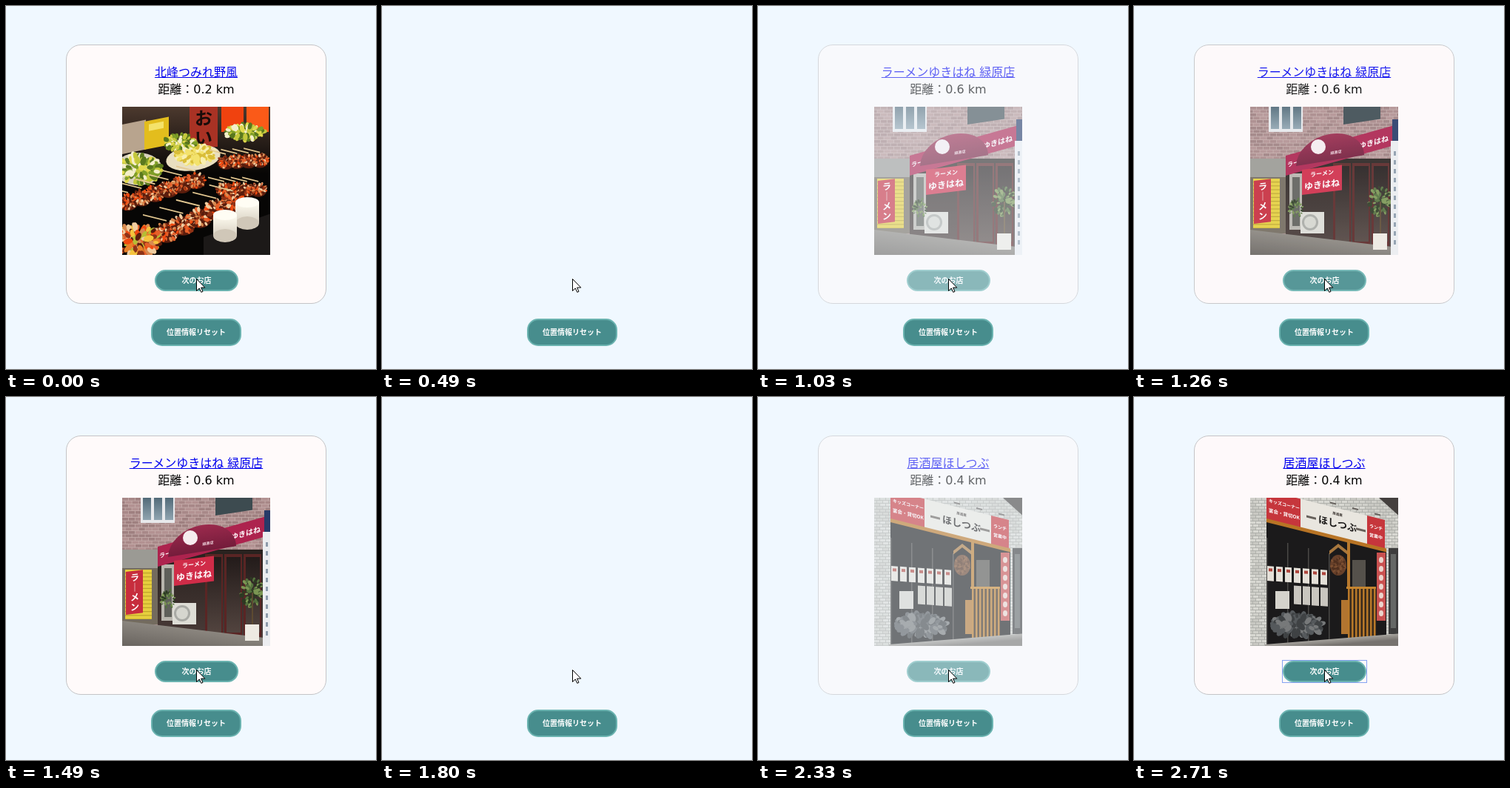
An HTML page with a canvas that plays this animation: 500x490 px, repeating every 2790 ms.

```html
<!DOCTYPE html>
<html lang="ja">
<head>
<meta charset="utf-8">
<title>お店さがし</title>
<style>
  html, body { margin: 0; width: 100%; height: 100%; overflow: hidden; background: #f0f8ff; }
  body { position: relative; font: 16px/24px "DejaVu Sans", "Noto Sans CJK JP", "Noto Sans CJK", sans-serif; color: #000; }
  .card {
    position: absolute; left: 81px; top: 52px; width: 352px; height: 350px;
    box-sizing: border-box; border: 1px solid #c4c4c6; border-radius: 20px;
    background: #fffafa; text-align: center; opacity: 0;
  }
  .card p { position: absolute; left: 0; width: 100%; margin: 0; white-space: nowrap; }
  .name { top: 25px; font-weight: 350; }
  .name a { color: #00e; text-decoration: underline 1px; }
  .distance { top: 48px; }
  canvas { position: absolute; left: 75px; top: 83px; }
  button {
    position: absolute; box-sizing: border-box; margin: 0; padding: 0 0 2px;
    border: 2px solid #6bb3b0; border-radius: 15px; background: #478d8d; color: #fff;
    font: 900 10px "Noto Sans CJK JP", "Noto Sans CJK", sans-serif; white-space: nowrap;
  }
  .next { left: 119px; top: 303px; width: 113px; height: 29px; }
  .reset { left: 196px; top: 422px; width: 122px; height: 37px; }
  .pressed .next::after { content: ""; position: absolute; inset: -3px; border: 1px solid #86a3f2; }
  .cursor { position: absolute; left: 257px; top: 367px; }
</style>
</head>
<body>
<button class="reset">位置情報リセット</button>
<svg class="cursor" width="14" height="21">
  <path d="M.5 1.5V17.5L4.3 14L6.8 19.4L9 18.4L6.6 13.1H11.8Z" fill="#fff" stroke="#000"/>
</svg>
<script>
const LOOP = 2790, STEP = 76.5, FADE = 950;
const SHOW = [0, 490, 490 + 17 * STEP];
const PRESSES = [[170, SHOW[1]], [1650, SHOW[2]], [2700, LOOP]];
const JP = '"Noto Sans CJK JP", "Noto Sans CJK", sans-serif';
const SALAD = ["#7f9e28", "#e2d94c", "#f4efca", "#5a781e", "#c4c83c"];
const MEAT = ["#8f3317", "#e5602a", "#5a1d0d", "#f04a10", "#d98a50", "#f1cda0"];

let g, seed;
const rand = (a = 0, b = 1) => {
  seed = (seed * 16807) % 2147483647;
  return a + (b - a) * seed / 2147483647;
};
const times = (n, fn) => { for (let i = 0; i < n; i++) fn(i); };

function rect(color, x, y, w, h) {
  g.fillStyle = color;
  g.fillRect(x, y, w, h);
}
function oval(color, x, y, rx, ry = rx, turn = 0) {
  g.fillStyle = color;
  g.beginPath();
  g.ellipse(x, y, rx, ry, turn, 0, 7);
  g.fill();
}
function label(text, color, size, x, y) {
  g.fillStyle = color;
  g.font = `900 ${size}px ${JP}`;
  g.textAlign = "center";
  g.textBaseline = "middle";
  g.fillText(text, x, y);
}
function column(text, color, size, x, y) {
  [...text].forEach((c, i) => label(c === "ー" ? "｜" : c, color, size, x, y + i * size * 1.1));
}
// Draws in a space that starts at x, y and slopes like a wall in perspective
function tilt(x, y, slope, paint) {
  g.save();
  g.transform(1, slope, 0, 1, x, y);
  paint();
  g.restore();
}
function fade(top, bottom, y, h) {
  const fill = g.createLinearGradient(0, y, 0, y + h);
  fill.addColorStop(0, top);
  fill.addColorStop(1, bottom);
  return fill;
}
function tiles(joint, colors, w, h) {
  rect(joint, 0, 0, 200, 200);
  times(200 / h, row => times(200 / w + 1, col =>
    rect(colors[Math.floor(rand(0, colors.length))], (col - row % 2 / 2) * w, row * h, w - .8, h - .8)));
}
// Random patches inside an ellipse
function scatter(colors, x, y, r, flat = .6) {
  times(r * 5, i => {
    const a = rand(0, 6.28), d = r * Math.sqrt(rand()), size = rand(.08, .2) * r + .5;
    oval(colors[i % colors.length], x + d * Math.cos(a), y + d * flat * Math.sin(a), size, size * .6, a);
  });
}
function skewers(x, y, slope, count, size) {
  times(count, i => {
    const cx = x + i * size * 1.4, cy = y + i * size * 1.4 * slope;
    tilt(cx, cy, .25, () => rect("#e4c992", -size * 2, -size, size * 2, 1.8));
    oval(MEAT[2], cx, cy + 2, size, size * .8);
    scatter(MEAT, cx, cy, size, .75);
  });
}

function food() {
  rect(fade("#4c392e", "#070605", 0, 90), 0, 0, 200, 200);
  tilt(0, 24, -.2, () => rect("#b8a48e", 0, 0, 32, 40));
  tilt(30, 20, -.2, () => {
    rect("#e3bd1d", 0, 0, 33, 38);
    rect("#f4e26a", 6, 5, 20, 9);
  });
  tilt(91, 0, -.05, () => {
    rect("#a93224", 0, 0, 38, 56);
    column("おい", "#1a0c0a", 24, 19, 16);
  });
  times(2, i => rect(["#f0420f", "#fa5a18"][i], 134 + i * 34, 0, 30, 34));

  oval("#e9dfc0", 96, 69, 37, 17, -.15);
  scatter(["#f3e26c", "#f8efb0", "#d9bd38"], 98, 64, 26, .5);
  scatter(SALAD, 78, 48, 21, .5);
  scatter(SALAD, 166, 34, 26, .35);
  oval("#d8d2bc", 22, 84, 32, 22);
  scatter(SALAD, 22, 84, 29, .65);

  skewers(140, 74, -.05, 4, 11);
  skewers(138, 111, 0, 4, 11);
  skewers(8, 128, -.32, 6, 13);
  skewers(60, 169, -.45, 5, 16);
  scatter([...MEAT, "#f6c33d", "#e8822a", "#b6bd35"], 18, 180, 32, .65);

  tilt(110, 176, -.35, () => rect("#1c1918", 0, 0, 90, 90));
  times(2, i => {
    const x = 169 - i * 30, y = 129 + i * 17;
    rect(fade("#fffdf2", "#d0c7b8", y, 34), x - 16, y, 32, 28);
    oval("#d0c7b8", x, y + 28, 16, 9);
    oval("#fffdf4", x, y, 16, 7);
  });
}

function noodleShop() {
  tiles("#c5adab", ["#a88888", "#9f8080", "#b39292"], 9, 4.5);
  rect("#e8e9ec", 25, 0, 46, 34);
  times(3, i => rect(fade("#526a78", "#90a4b0", 0, 30), 28 + i * 15, 0, 11, 30));
  tilt(126, 0, -.15, () => rect("#3d4b50", 0, 0, 50, 24));

  rect("#9b9a94", 0, 70, 50, 28);
  rect("#736b5e", 0, 95, 50, 76);
  rect("#bda42b", 4, 97, 36, 67);
  times(13, i => rect("#e6cf3e", 4, 97 + i * 5.2, 36, 4));
  tilt(5, 100, -.12, () => {
    rect("#c72d3d", 0, 0, 23, 58);
    column("ラーメン", "#fff", 12, 12, 9);
  });

  rect(fade("#29221f", "#4a3b38", 80, 110), 48, 70, 146, 125);
  rect("#b8b5ad", 53, 90, 17, 76);
  rect("#5f605a", 57, 95, 10, 66);
  times(3, i => {
    rect("#5a2524", 112 + i * 26, 76, 24, 112);
    rect(fade("#231b1a", "#51433e", 80, 100), 115 + i * 26, 80, 19, 102);
  });

  tilt(48, 66, -.28, () => {
    rect("#ad234e", 0, 0, 145, 27);
    label("ラー", "#fff", 8, 10, 13);
    label("ゆきはね", "#fff", 10, 119, 15);
  });
  tilt(62, 80, -.16, () => {
    g.beginPath();
    g.ellipse(46, 0, 46, 36, 0, Math.PI, 0);
    g.fillStyle = fade("#9c2a4d", "#741c3b", -36, 36);
    g.fill();
    label("緑原店", "#f5dfe6", 5, 54, -10);
  });
  oval("#f6ecef", 92, 54, 10);
  tilt(70, 85, -.12, () => {
    rect("#d02c48", 0, 0, 54, 34);
    label("ラーメン", "#fff", 8, 27, 8);
    label("ゆきはね", "#fff", 12, 27, 23);
  });

  tilt(0, 166, .12, () => rect(fade("#8b867f", "#69645f", 0, 34), 0, 0, 200, 60));
  rect("#deddd6", 68, 142, 32, 29);
  oval("#a9aaa5", 81, 156, 11);
  oval("#d6d6cf", 81, 156, 8);
  times(2, i => scatter(["#54713d", "#7b9653", "#2c3a22"], 176 - i * 114, 128 + i * 8, 16 - i * 6, 1.2));
  rect("#5d4a31", 175, 128, 2, 44);
  rect("#eeeae2", 166, 171, 19, 22);
  rect("#263a68", 192, 17, 8, 32);
  rect("#ecedf0", 190, 46, 10, 154);
  times(11, i => rect("#8d9bab", 194, 60 + i * 12, 3, 6));
}

function tavern() {
  tiles("#a9aaa5", ["#d0d0ca", "#d8d8d2", "#c8c8c2"], 8, 4);
  tilt(174, 0, .9, () => rect("#44403e", 0, -24, 26, 24));
  tilt(22, -10, .25, () => {
    rect("#1b1a1b", 0, 40, 162, 180);
    rect("#e9e6df", 0, 0, 160, 39);
    rect("#c6363c", 0, 0, 46, 39);
    rect("#c6363c", 136, 0, 24, 39);
    label("キッズコーナー", "#fff", 6, 24, 13);
    label("宴会・貸切OK", "#fff", 6.5, 24, 26);
    label("居酒屋", "#39332f", 4.5, 96, 8);
    label("ほしつぶ", "#1c1a19", 13, 96, 21);
    label("ランチ", "#fff", 6, 148, 13);
    label("営業中", "#fff", 6, 148, 25);
    times(2, i => rect("#67615b", 54 + i * 67, 20, 13, 3));
    rect("#b87425", 0, 38, 162, 5);
    times(3, i => rect("#66615d", 86 + i * 30, -6, 8, 2));
  });

  times(4, i => rect("#4a4846", 22 + i * 28, 54 + i * 7, 1.5, 145));
  tilt(23, 92, .07, () => times(7, i => {
    rect("#e4e0d8", i * 12, 0, 9, 20);
    rect("#b0463d", i * 12 + 2, 3, 5, 4);
    if (i > 2) rect("#c9c6bf", i * 12, 24, 10, 25);
  }));
  rect("#d5d3cc", 34, 126, 19, 24);
  scatter(["#55595c", "#77797a", "#3f4244"], 65, 172, 34, .4);

  times(2, i => tilt(119, 62, i ? .8 : -.8, () => rect("#a9783e", i ? 0 : -12, 0, 12, 5)));
  oval("#67402a", 119, 91, 11, 14);
  scatter(["#7d5032", "#50301f"], 119, 91, 10, 1.2);
  rect("#55514b", 138, 84, 18, 36);
  rect("#b8792d", 131, 58, 4, 64);
  rect("#b27530", 123, 138, 9, 46);
  rect("#392a1d", 132, 122, 38, 68);
  times(8, i => rect("#b97929", 132 + i * 5, 121, 2.5, 72));
  rect("#c5852f", 130, 120, 40, 3);

  rect("#c95150", 171, 74, 12, 92);
  times(7, i => oval("#ecd4cc", 177, 84 + i * 12, 3, 4));
  rect("#3d3d3d", 187, 68, 13, 116);
  rect("#656866", 190, 76, 7, 100);
  tilt(20, 198, -.08, () => rect(fade("#a5a29c", "#77736f", 0, 8), 0, 0, 180, 30));
}

const shops = [
  ["北峰つみれ野風", "0.2", food],
  ["ラーメンゆきはね 緑原店", "0.6", noodleShop],
  ["居酒屋ほしつぶ", "0.4", tavern],
];
const cards = shops.map(([name, km, paint], i) => {
  const card = document.createElement("section");
  card.className = "card";
  card.innerHTML = `<p class="name"><a>${name}</a></p><p class="distance">距離：${km} km</p>
    <canvas width="200" height="200"></canvas><button class="next">次のお店</button>`;
  document.body.insertBefore(card, document.querySelector(".cursor"));
  g = card.querySelector("canvas").getContext("2d");
  seed = 7100 + i;
  paint();
  return card;
});

const ease = x => x * x * (3 - 2 * x);
const start = performance.now();

function draw() {
  const t = (performance.now() - start) % LOOP;
  // The fade advances in even ticks
  const tick = SHOW[1] + Math.floor((t - SHOW[1]) / STEP) * STEP;
  const current = tick >= SHOW[2] ? 2 : tick >= SHOW[1] ? 1 : 0;
  const pressed = PRESSES.some(([from, to]) => t >= from && t < to);
  cards.forEach((card, i) => {
    const shown = i === current;
    card.style.opacity = !shown ? 0 : i === 0 ? 1 : ease(Math.min(1, (tick - SHOW[i]) / FADE));
    card.classList.toggle("pressed", shown && pressed);
  });
  requestAnimationFrame(draw);
}
draw();
</script>
</body>
</html>
```
